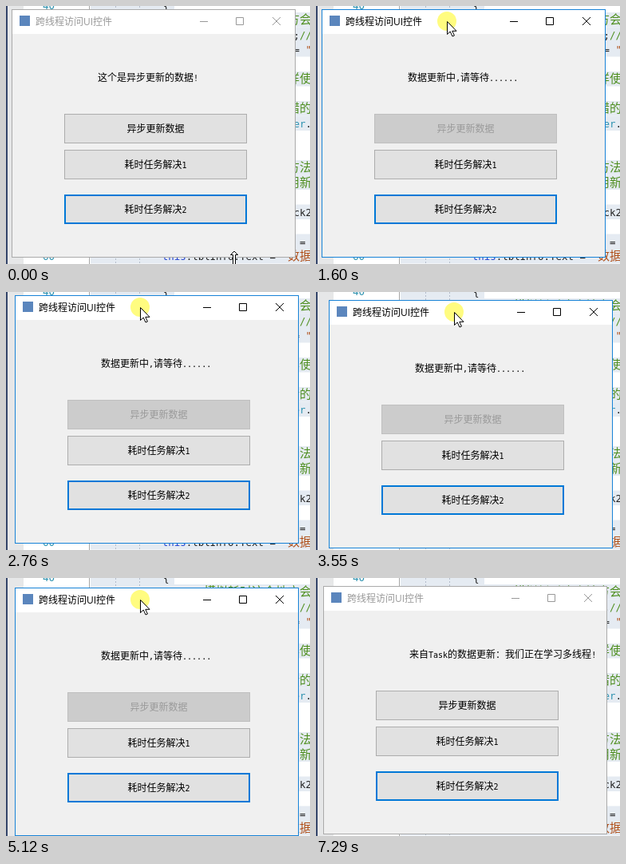
Recreate the animation shown at these times as an HTML page. Size 381x323 px, loop 7.45 s.

```html
<!DOCTYPE html>
<html lang="zh">
<head>
<meta charset="utf-8">
<title>跨线程访问UI控件</title>
<style>
html, body { margin: 0; width: 100%; height: 100%; overflow: hidden; background: #fff; }
svg { display: block; }
text { white-space: pre; font: 12px "Noto Sans CJK SC", "Noto Sans CJK", sans-serif; }
.mono { font-family: "DejaVu Sans Mono", monospace; font-size: 10px; }
.code { font-size: 15px; fill: #222; }
.code .mono { font-size: 12.45px; }
.comment { fill: #4f8f20; }
.string { fill: #b0501a; }
.keyword { fill: #2040d0; }
.type, .number { fill: #2b91af; }
.title { font-family: "Open Sans", "Noto Sans CJK SC", "Noto Sans CJK", sans-serif; fill: #000; }
.glyph { fill: none; stroke: #000; }
.frame { fill: #f0f0f0; stroke: #1883d7; }
.inactive .title { fill: #999; }
.inactive .glyph { stroke: #999; }
.inactive .frame { stroke: #aaa; }
.button rect { fill: #e1e1e1; stroke: #adadad; }
.button.focus rect { stroke: #0078d7; stroke-width: 2; }
.button.hover rect { fill: #e5f1fb; stroke: #0078d7; }
.button.disabled rect { fill: #ccc; stroke: #bfbfbf; }
.button.disabled text { fill: #9a9a9a; }
</style>
</head>
<body>
<svg id="stage" width="381" height="323" viewBox="0 0 381 323"></svg>
<script>
const LOOP = 7450, STEP = 77.6, PHASE = 40;
const GRIP = { x: 157, y: 15 };
const PRESS = 360, CLICK = 450, RELEASE = 510, GRAB = 1600, DROP = 6130, DONE = 7290;

const key = (t, x, y) => ({ t, x, y });
const windowPath = [
  key(GRAB, 7, 4), key(1980, 23, 8), key(2290, 21, 0), key(2760, 11, 4), key(3160, 11, 4),
  key(3400, 21, 10), key(3800, 2, 9), key(4250, 0, 8), key(5110, 11, 12),
  key(5430, 2, 8), key(5650, 17, 6), key(5810, 9, 10)
];
const arrivePath = [
  key(70, 286, 318), key(PRESS, 236, 160), key(CLICK, 236, 160),
  key(740, 252, 297), key(830, 252, 297), key(1520, 164, 19)
];
const leavePath = [key(DROP, 166, 25), key(6740, 332, 335)];

// Position on a path, easing in and out of every key
function along(path, t) {
  const next = path.findIndex(k => k.t > t);
  if (next === 0) return path[0];
  if (next < 0) return path[path.length - 1];
  const a = path[next - 1], b = path[next];
  const p = (1 - Math.cos(Math.PI * (t - a.t) / (b.t - a.t))) / 2;
  return { x: Math.round(a.x + (b.x - a.x) * p), y: Math.round(a.y + (b.y - a.y) * p) };
}

// Latin runs use a half-width face beside the full-width characters
const mixed = s => s.replace(/[\x20-\x7e]+/g, run => `<tspan class="mono">${run}</tspan>`);
const rect = (x, y, w, h, fill) => `<rect x="${x}" y="${y}" width="${w}" height="${h}" fill="${fill}"/>`;

const kindOf = s => s.startsWith('//') ? 'comment' : s[0] === '"' ? 'string'
  : s === 'this' ? 'keyword' : s.endsWith('Handler') ? 'type' : '';
const highlight = line => line.split(/(\/\/.*|"[^"]*|this|\w*Handler)/)
  .map(s => `<tspan class="${kindOf(s)}">${mixed(s)}</tspan>`).join('');

const lines = [
  '', '//模拟耗时这个地方会', 'Thread.Sleep(3000);//', 'Text = "', '', '//这样使', '', '//报错的',
  'new EventHandler.', '', '', '//个方法', '//使用新', '', 'Click2', '', 'd = ', 'this.lblInfo.Text = "数据'
];
const lineY = k => 18.5 * k + 3.5;
const selection = (k, width) => rect(106, lineY(k) - 14, width, 18.5, '#e5ebf2');
const codeLine = (line, k) => line && selection(k, 275) +
  `<text class="code" x="383" y="${lineY(k)}" text-anchor="end">${highlight(line)}</text>`;
const lineNumber = (n, k) =>
  `<text class="code" x="46" y="${lineY(k)}"><tspan class="number">${mixed(n)}</tspan></text>`;

const editor =
  rect(0, 0, 381, 323, '#fff') + rect(2, 0, 20, 323, '#e6e7e8') + rect(0, 0, 2, 323, '#35466b') +
  selection(0, 105) + lines.map(codeLine).join('') +
  '<path d="M104.5 0V323" stroke="#a5a5a5"/>' +
  '<path d="M137.5 0V323M167.5 0V323" stroke="#b4bccb" stroke-dasharray="2 2"/>' +
  lineNumber('40', 0) + lineNumber('60', 17) +
  `<text class="code" x="197" y="${lineY(0)}">${mixed('{')}</text>`;

const buttons = [
  { y: 131, text: '异步更新数据' },
  { y: 176, text: '耗时任务解决1' },
  { y: 232, text: '耗时任务解决2', focus: true }
];
function buttonMarkup({ y, text, focus }) {
  const inset = focus ? 1 : 0.5;
  return `<g class="button${focus ? ' focus' : ''}">
    <rect x="${66 + inset}" y="${y + inset}" width="${229 - 2 * inset}" height="${37 - 2 * inset}"/>
    <text x="180.5" y="${y + 23}" text-anchor="middle">${mixed(text)}</text></g>`;
}

const stage = document.getElementById('stage');
stage.innerHTML = `${editor}
<g id="form">
  <rect class="frame" x=".5" y=".5" width="355" height="310"/>
  ${rect(1, 1, 354, 30, '#fff')}
  ${rect(10, 8, 13, 13, '#5b86bd')}
  <text class="title" x="30" y="20">跨线程访问UI控件</text>
  <path class="glyph" d="M236 15.5h10M281.5 10.5h9v9h-9zM327 10l10 10M337 10l-10 10"/>
  <text id="label" x="108" y="90"></text>
  ${buttons.map(buttonMarkup).join('')}
</g>
<circle id="halo" r="12" fill="#fffb6a" fill-opacity=".85"/>
<g id="pointer" fill="#fff" stroke="#000">
  <path id="arrow" d="M.5 .5V16.5L4.2 13L7 19L9.4 18L6.8 12.3H12Z"/>
  <path id="resize" d="M0-11L4.5-6.5H1.5V6.5H4.5L0 11L-4.5 6.5H-1.5V-6.5H-4.5Z"/>
</g>`;

const [form, label, halo, pointer, arrow, resize] =
  ['form', 'label', 'halo', 'pointer', 'arrow', 'resize'].map(id => document.getElementById(id));
const buttonNodes = [...document.querySelectorAll('.button')];
const show = (node, on) => node.setAttribute('visibility', on ? 'visible' : 'hidden');
const move = (node, { x, y }) => node.setAttribute('transform', `translate(${x} ${y})`);
const within = (t, start, end) => t >= start && t < end;

function draw(t) {
  const sampled = Math.floor((t - PHASE) / STEP) * STEP + PHASE;
  const origin = along(windowPath, sampled);
  const dragging = within(t, GRAB, DROP);
  const tip = dragging ? { x: origin.x + GRIP.x, y: origin.y + GRIP.y }
    : along(t < GRAB ? arrivePath : leavePath, sampled);
  const busy = within(t, CLICK, DONE);

  move(form, origin);
  move(halo, tip);
  move(pointer, tip);
  form.setAttribute('class', within(t, PRESS, DONE) ? '' : 'inactive');
  show(halo, dragging || within(t, PRESS, RELEASE));
  show(arrow, t >= 70);
  show(resize, t < 70);

  const text = busy ? '数据更新中,请等待......'
    : t < CLICK ? '这个是异步更新的数据!' : '来自Task的数据更新：我们正在学习多线程!';
  if (label.textContent !== text) label.innerHTML = mixed(text);

  const x = tip.x - origin.x, y = tip.y - origin.y;
  buttonNodes.forEach((node, i) => {
    const off = i === 0 && busy;
    const top = buttons[i].y;
    node.classList.toggle('disabled', off);
    node.classList.toggle('hover', !off && within(x, 66, 295) && within(y, top, top + 37));
  });
}

const began = performance.now();
function tick() {
  draw(Math.max(0, performance.now() - began) % LOOP);
  requestAnimationFrame(tick);
}
tick();
</script>
</body>
</html>
```
